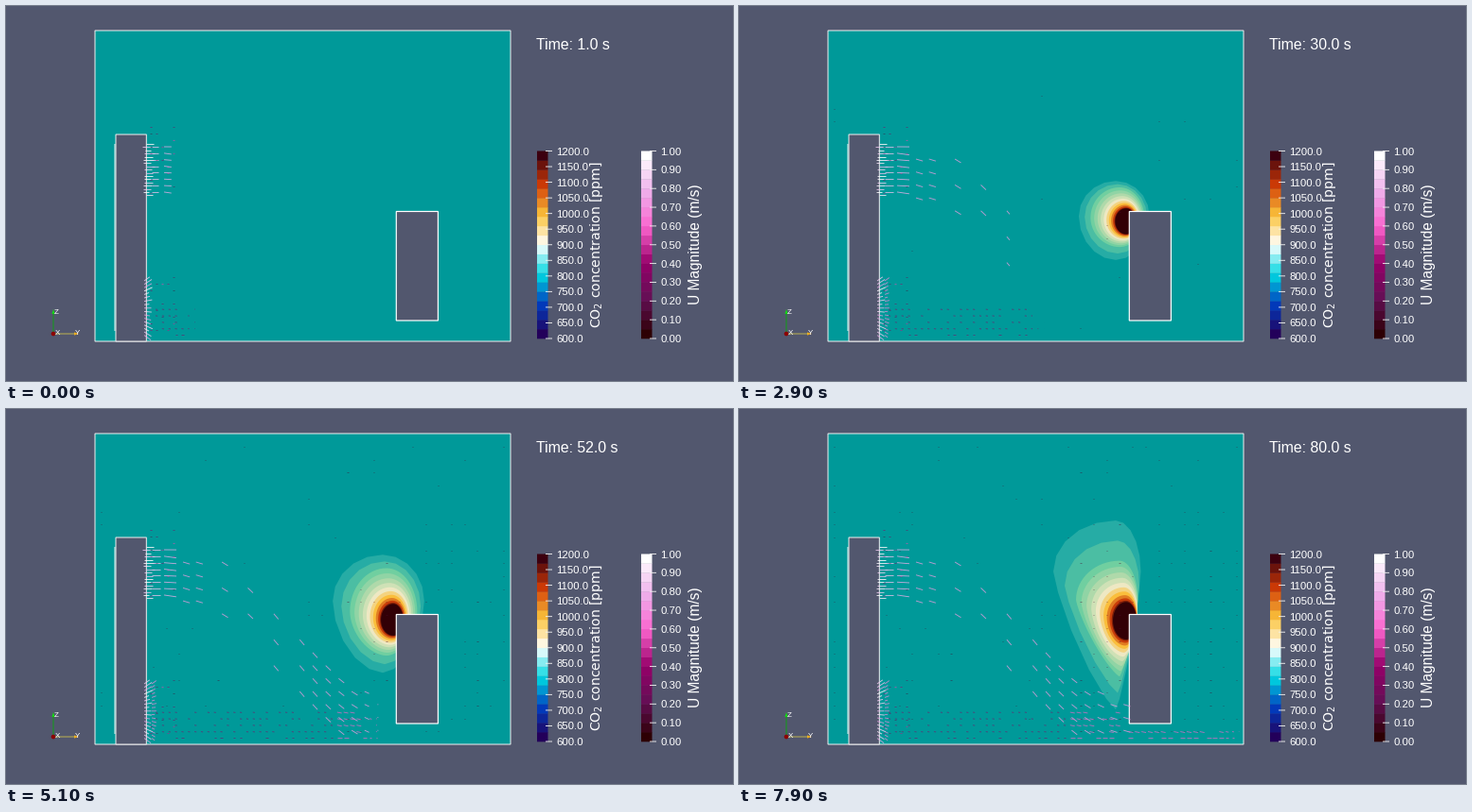
Animation of 768x397 px, one loop 8000 ms. Source, as a matplotlib script:

```python
import numpy as np
import matplotlib.pyplot as plt
from matplotlib.animation import FuncAnimation
from matplotlib.collections import LineCollection
from matplotlib.patches import Circle, Polygon, Rectangle

W, H, DPI = 768, 397, 100
FRAMES, STEP = 80, 100
BG, TEAL, EDGE = "#52576e", "#009999", "#f0f0f0"
PX = 72 / DPI

fig = plt.figure(figsize=(W / DPI, H / DPI), dpi=DPI, facecolor=BG)
ax = fig.add_axes([0, 0, 1, 1])
ax.set_xlim(0, W)
ax.set_ylim(H, 0)
ax.axis("off")


def text(x, y, s, size, font="Liberation Sans", **kw):
    kw = {"ha": "left", "va": "center_baseline", "color": "white", **kw}
    return ax.text(x, y, s, fontsize=size * PX, family=font, **kw)


def box(x0, y0, x1, y1, fill, edge="none", lw=1.0, z=1):
    ax.add_patch(Rectangle((x0, y0), x1 - x0, y1 - y0, facecolor=fill,
                           edgecolor=edge, lw=lw * PX, zorder=z, snap=False))


def line(x0, y0, x1, y1, color="white", lw=1.0, z=6):
    ax.plot([x0, x1], [y0, y1], color=color, lw=lw * PX, zorder=z,
            solid_capstyle="butt", snap=False)


def ramp(colors, u):
    c = np.array(colors) / 255
    stops = np.linspace(0, 1, len(c))
    return np.stack([np.interp(u, stops, c[:, k]) for k in range(3)], axis=-1)


# Colour scales, low to high
CO2 = [(35, 0, 90), (0, 60, 190), (0, 215, 225), (255, 255, 255),
       (250, 195, 60), (210, 60, 5), (60, 0, 15)]
SPEED = [(45, 0, 4), (100, 15, 85), (150, 0, 105), (250, 100, 205),
         (238, 175, 235), (255, 255, 255)]
PLUME = [(38, 172, 165), (112, 207, 160), (175, 217, 170), (238, 232, 195),
         (250, 190, 60), (200, 60, 10), (50, 0, 6)]


def colorbar(x, colors, labels, top=153.5, bottom=352, n=20):
    h = (bottom - top) / n
    for k, c in enumerate(ramp(colors, np.linspace(0, 1, n))):
        y = bottom - k * h
        box(x, y - h, x + 11.5, y + 0.3, c)
    for y, s in zip(np.linspace(bottom, top, len(labels)), labels):
        line(x + 9, y, x + 16, y, EDGE, 0.9)
        text(x + 20, y, s, 11.4)


colorbar(561, CO2, [f"{v}.0" for v in range(600, 1201, 50)])
colorbar(671, SPEED, [f"{v / 10:.2f}" for v in range(11)])
text(624, 253, "CO$_2$ concentration [ppm]", 14, "DejaVu Sans",
     rotation=90, ha="center", va="center")
text(728, 252.5, "U Magnitude (m/s)", 15.5, rotation=90, ha="center", va="center")
clock = text(560.5, 40.3, "", 15.9)

# Orientation axes
line(50, 347, 50, 325, "#00b000", 0.8)
line(50, 347, 73, 347, "#d8c84a", 0.8)
ax.add_patch(Polygon([(48.4, 326), (51.6, 326), (50, 321)], color="#10e010", lw=0))
ax.add_patch(Polygon([(72, 345.4), (72, 348.6), (77, 347)], color="#f0a818", lw=0))
ax.add_patch(Circle((50, 347), 2.3, color="#8c0000", lw=0, zorder=7))
for x, y, s in [(54, 345, "X"), (75, 346, "Y"), (53.5, 323, "Z")]:
    text(x, y, s, 8, ha="center", zorder=8)

# Room, radiator and body
box(94, 26, 533, 355, TEAL, EDGE)
box(116, 136, 148.3, 355, BG, EDGE, 1, 5)
line(115, 146, 115, 344, EDGE)
box(412.3, 217.5, 456.4, 333, BG, "white", 1.2, 5)


# Plume: each contour is (cx, cy, left, right, top, bottom) for progress u in 0..1
def contours(u):
    lean = 30 * np.sin(2.55 * u) ** 1.5
    sag = 38 * u ** 0.2 + 43 * u ** 4
    onset = u ** 0.1
    outer = (398, 237 - 65 * u ** 1.5, 412 - 80 * u ** 0.41, 412 + lean,
             237 - 119 * u ** 0.83, 237 + sag)
    middle = (402, 237 - 35 * u, 412 - 56 * u ** 0.32, 412 + 0.75 * lean,
              237 - 77 * np.sin(1.7 * u), 237 + 0.57 * sag)
    top = 237 - 33 * np.sin(1.7 * u ** 0.8)
    bottom = 237 + (13 - 10 * np.sin(2.5 * u)) * onset
    core = (409, (top + bottom) / 2, 412 - 17 * u ** 0.15, 412 + 8 * onset, top, bottom)
    return [np.array(c) for c in (outer, middle, core)]


def outline(shape, n, low):
    """Egg shape whose lower half narrows as the exponent drops towards 1."""
    cx, cy, left, right, top, bottom = shape
    a = np.linspace(0, 2 * np.pi, n, endpoint=False)
    c, s = np.cos(a), np.sin(a)
    p = np.where(s > 0, 2 / low, 1)
    x = cx + np.where(c > 0, right - cx, cx - left) * np.sign(c) * np.abs(c) ** p
    y = cy + np.where(s > 0, bottom - cy, cy - top) * np.sign(s) * np.abs(s) ** p
    return np.column_stack([x, y])


# Level -1 is the outer contour, 0 the middle one, 1 the core
LEVELS = np.r_[-1, -0.5, 1 - (1 - np.linspace(0, 1, 11)) ** 1.5]
bands = [ax.add_patch(Polygon([(0, 0)] * 3, facecolor=c, lw=0, zorder=2 + 0.1 * k))
         for k, c in enumerate(ramp(PLUME, np.linspace(0, 1, len(LEVELS))))]

# Velocity glyphs: x, y, dx, dy, speed, time of appearance
rng = np.random.default_rng(4)
CELL = 13.7
glyphs = []


def jet(x):
    return 172 + 175 * (1 - np.exp(-(np.maximum(x - 150, 0) / 170) ** 3))


def arrival(x):
    return 90 * (max(x - 150, 0) / 380) ** 0.85 - 10


def glyph(x, y, length, slope, speed, start=None):
    d = length / np.hypot(1, slope)
    glyphs.append((x, y, d, d * slope, speed, arrival(x) if start is None else start))


# Outflow at the upper and lower grilles
for y in np.arange(146, 201, 3.4):
    glyph(rng.uniform(144, 148), y, rng.uniform(5, 11), 0, rng.uniform(0.8, 1), -8)
for y in np.arange(149, 200, CELL / 2):
    glyph(154, y, 9, 0, 0.85, -3)
    glyph(167, y, 13, rng.uniform(0, 0.15), 0.8, -2)
for y in np.arange(291, 350, 3.6):
    tilt = (y - 320) / 40
    glyph(146, y, rng.uniform(5, 10), tilt, rng.uniform(0.75, 1), -8)
    glyph(154, y, rng.uniform(3, 6), tilt, 0.7, 2)

# Falling jet, on a finer lattice near the floor
for i, x in enumerate(np.arange(189, 412, CELL)):
    mid, slope = jet(x), (jet(x + 5) - jet(x - 5)) / 10
    for j, y in enumerate(np.arange(163, 345, CELL)):
        coarse = 210 < x < 320 and (i % 2 == 0 or j % 2 == 1)
        if abs(y - mid) < 33 and not coarse:
            glyph(x - 2, y - 1, 7.5, max(slope, 0.3), 0.75)

# Flow along the floor
for x in np.arange(158, 528, CELL / 2):
    for y in np.arange(321, 350, CELL / 2):
        ahead = x > 345
        if rng.random() < 0.7 and (y > 338 or x < 400):
            glyph(x, y, 5 if ahead else 2.2, 0.2 if y < 345 else 0,
                  0.6 if ahead else 0.35, None if ahead else arrival(x) - 6)

# Slow specks: near the grilles from the beginning, elsewhere as the air mixes
for x in np.arange(152, 182, 6):
    for y in np.r_[np.arange(128, 205, 7), np.arange(280, 350, 7)]:
        if rng.random() < 0.3:
            glyph(x, y, 2, 0, rng.uniform(0.1, 0.6), -8)
for x in np.arange(100, 530, CELL):
    for y in np.arange(40, 350, CELL):
        solid = 112 < x < 150 or (408 < x < 460 and 213 < y < 337)
        near = x < 112 or (x > 350 and y > 145)
        if not solid and rng.random() < (0.6 if near else 0.12):
            glyph(x, y, 1.2, 0, 0.1, rng.uniform(20, 75))

G = np.array(glyphs)
tint = ramp(SPEED, G[:, 4])
opacity = 0.4 + 0.5 * G[:, 4]
arrows = LineCollection([], linewidths=0.9 * PX, zorder=6)
ax.add_collection(arrows)


def draw(i):
    t, u = i + 1, i / (FRAMES - 1)
    clock.set_text(f"Time: {t:.1f} s")
    outer, middle, core = contours(u)
    low = 2 - 0.75 * u ** 3
    for patch, f in zip(bands, LEVELS):
        shape = middle + (middle - outer if f < 0 else core - middle) * f
        patch.set_xy(outline(shape, 20 if f < 0 else 64, low + (2 - low) * max(f, 0)))

    grow = np.clip((t - G[:, 5]) / 5, 0, 1)
    start = G[:, :2]
    arrows.set_segments(np.stack([start, start + G[:, 2:4] * grow[:, None]], axis=1))
    arrows.set_color(np.column_stack([tint, opacity * (grow > 0)]))
    return [clock, arrows, *bands]


anim = FuncAnimation(fig, draw, frames=FRAMES, interval=STEP, repeat=True,
                     repeat_delay=0, blit=False)
plt.show()
```
